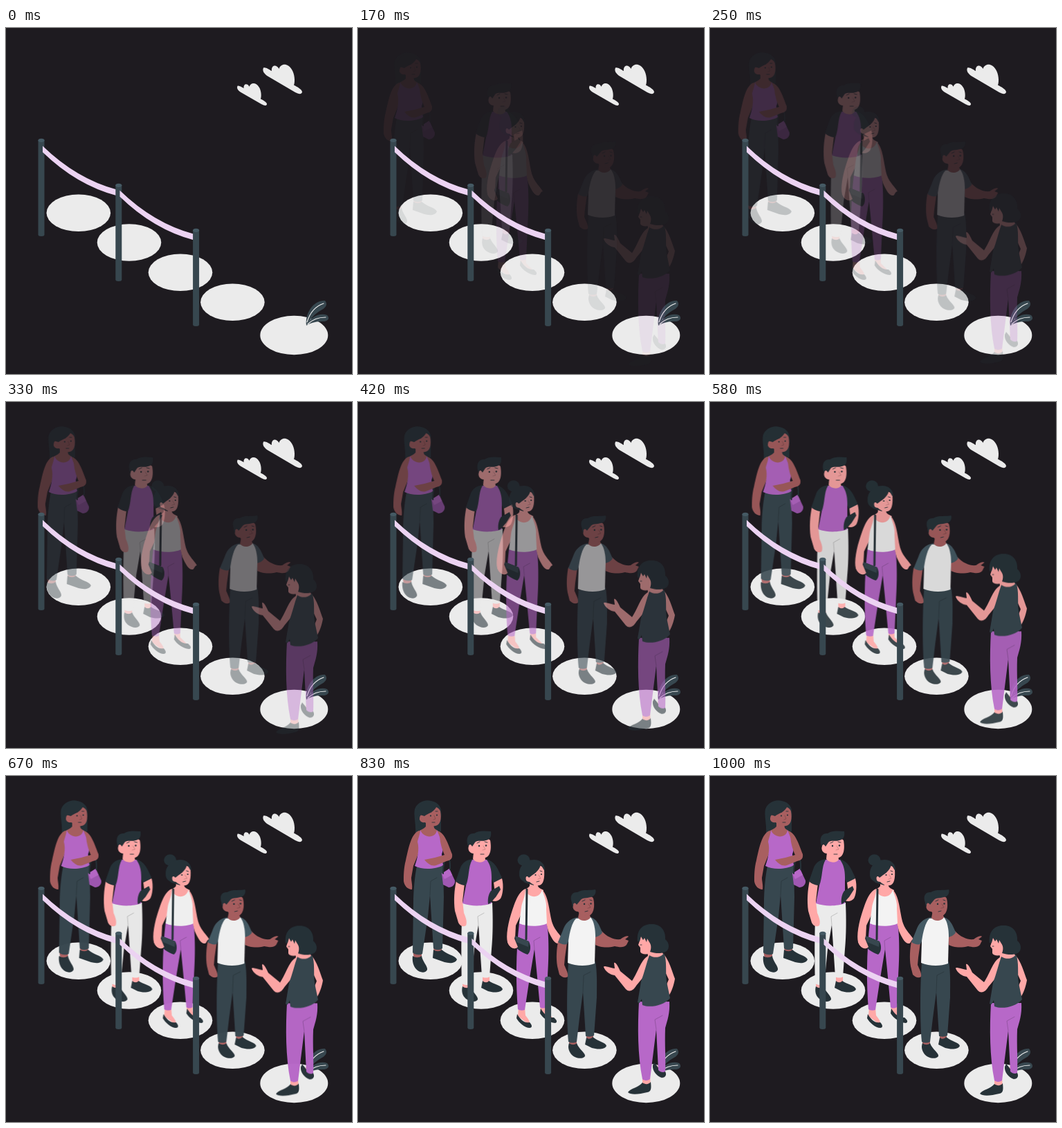
Recreate the animation shown at these times as an HTML page. Size 500 by 500 pixels, loop 1040 ms.

```html
<!DOCTYPE html>
<html lang="en">
<head>
<meta charset="utf-8">
<title>Waiting line</title>
<style>
  html, body { margin: 0; width: 100%; height: 100%; overflow: hidden; background: #1e1b20; }
  svg { display: block; width: 100vw; height: 100vh; }
  .floor { fill: #ebebeb; }
  .ink { fill: #263238; }
  .slate { fill: #37474f; }
  .steel { fill: #455a64; }
  .purple { fill: #b768c8; }
  .plum { fill: #a058b2; }
  .white { fill: #f3f3f3; }
  .pale { fill: #ebebeb; }
  .brown { fill: #a85f60; }
  .pink { fill: #ffa8a7; }
  .rope { fill: #ecd3f2; }
  .line { fill: none; stroke: #263238; stroke-linecap: round; stroke-linejoin: round; }
  .thin { stroke-width: .9; }
  .fold { fill: none; stroke: #000; stroke-opacity: .18; stroke-width: 1; stroke-linecap: round; }
  .rib { fill: none; stroke: #f0f0f0; stroke-width: 1.2; stroke-linecap: round; }
</style>
</head>
<body>
<svg viewBox="0 0 500 500">
  <defs>
    <path id="cloud" d="M372 57.500C375 56 380 60 384 62C383 53 391 52 394.500 59C397 51 407 50 413 60C417 66 418 77 416 82.500C421 85 428 89 428 92.500C427 97 422 95 418 93L378 69.500C373 66 370 62 372 57.500Z"/>
    <g id="post">
      <path class="slate" d="M46.500 162V298.500A4.500 2.500 0 0 0 55.500 298.500V162Z"/>
      <ellipse class="steel" cx="51" cy="162.300" rx="4.500" ry="2.600"/>
    </g>
    <path id="rope" class="rope" d="M53 170.500Q102 218 160 233.500V242.300Q102 227 53 179.500Z"/>
  </defs>

  <g class="floor">
    <use href="#cloud"/>
    <use href="#cloud" transform="translate(51.800 40.500) scale(.76 .75)"/>
    <ellipse cx="104.800" cy="267.300" rx="46.300" ry="26.800"/>
    <ellipse cx="178" cy="310" rx="46.300" ry="26.800"/>
    <ellipse cx="252" cy="353.200" rx="46.300" ry="26.800"/>
    <ellipse cx="327.400" cy="396.300" rx="46.300" ry="26.800"/>
    <ellipse cx="416.300" cy="444" rx="49" ry="28.200"/>
  </g>

  <g class="slate">
    <path d="M434 430C432 411 445 393 461 394C466 400 461 405 455 408C446 413 440 420 434 430Z"/>
    <path d="M434 430C440 417 454 411 464 415C468 419 466 423 460 424C449 424 442 425 434 430Z"/>
    <path class="rib" d="M435 425C439 412 447 402 459 398M436 428C443 421 452 418 462 418"/>
  </g>

  <!-- woman with the purple bag -->
  <g data-from="-30 0">
    <path class="ink" d="M81 82C82 70 78 57 80 48C83 38 95 33 104 36C115 38 120 48 118 60V80L108 84H88Z"/>
    <path class="brown" d="M86 79C75 83 71 104 67 122C64 133 64 144 64 152C65 159 70 164 76 164C77 158 75 152 75 147L78 130L87 108Z"/>
    <path class="brown" d="M77 252H90V264H79ZM107 246H119V256H108Z"/>
    <path class="ink" d="M77 260C81 263 86 263 90 260C91 268 99 275 98 280C96 285 87 285 82 279C78 275 76 267 77 260ZM107 251C111 254 116 254 119 251C126 258 138 259 141 265C139 271 130 271 123 269L106 263Z"/>
    <path class="slate" d="M83 130C80 145 78 165 78 185L77 255C80 259 88 259 91 257L99 203L102 172L107 249C110 252 117 252 120 249L122 175L121 130Z"/>
    <path class="fold" d="M102 172L103 152L112 147"/>
    <path class="plum" d="M119 141L130 134L138 151C139 157 134 161 129 161L121 157Z"/>
    <path class="purple" d="M119 141L130 134L134 143L123 149Z"/>
    <path class="line" stroke-width="2" d="M121 141C121 130 123 119 128 117C132 122 131 129 131 135"/>
    <path class="brown" d="M96 64V73C93 77 87 78 82 82L88 100H114L118 83C115 79 110 78 108 75L107 69Z"/>
    <path class="purple" d="M88 78C88 83 85 90 84 95C87 106 84 119 80 130C91 136 110 135 121 129L119 113C123 103 121 93 116 88L112 78C111 90 93 91 88 78Z"/>
    <path class="brown" d="M90 52C92 43 114 40 117 51C119 62 117 71 110 72C104 73 98 71 95 67C89 68 86 64 87 59C87 56 89 55 91 57Z"/>
    <path class="ink" d="M84 60C82 45 91 37 102 37C112 37 118 43 118 51L112 43C109 52 99 54 94 58L91 57C88 55 87 59 87 63Z"/>
    <path class="brown" d="M115 80C124 84 129 100 134 113C135 120 131 122 126 123L111 129C104 131 99 127 94 121L109 118L123 114C120 108 118 100 117 95Z"/>
    <path class="line thin" d="M101 53L104 52M110 51L113 51M105 67L109 67"/>
    <path class="fold" d="M108 57L110 62L107 63"/>
    <g class="ink"><circle cx="103" cy="57.500" r="1.100"/><circle cx="112" cy="56.500" r="1.100"/></g>
  </g>

  <!-- man with the phone -->
  <g data-from="30 0">
    <path class="pink" d="M153 297H164V309H153ZM182 287H192V300H182Z"/>
    <path class="ink" d="M153 304C157 307 161 307 164 304C166 311 176 318 175 323C172 328 163 326 158 322C153 318 151 311 153 304ZM182 296C185 299 189 299 191 296C198 301 209 302 211 308C208 314 196 313 190 311L180 306Z"/>
    <path class="pale" d="M153 183H196C197 205 197 230 195 250L192 290C190 292 184 292 181 290L176 215L170 250L165 301C161 303 155 302 152 300C151 270 151 215 153 183Z"/>
    <path class="fold" d="M176 215L175 203L184 198"/>
    <path class="pink" d="M144 151L156 155L153 181L155 198C158 205 160 211 158 216C153 219 149 216 147 212L142 195C140 180 141 165 144 151Z"/>
    <path class="ink" d="M168 120C156 121 151 128 149 135L143 152C147 156 153 158 158 158L167 135ZM187 120C200 123 204 134 210 147C207 152 202 154 198 155L190 140Z"/>
    <path class="purple" d="M167 121C161 131 163 146 158 158L153 184C166 189 185 188 195 184L195 146C195 136 193 128 188 121Z"/>
    <path class="pink" d="M198 154L210 148C213 159 211 172 208 177C203 183 195 181 192 178L200 170Z"/>
    <path class="ink" d="M194 166L206 159L208 164L201 175C197 179 193 185 190 185C189 177 191 170 194 166Z"/>
    <path class="pink" d="M169 110L168 120C172 126 183 126 186 121L185 113Z"/>
    <path class="pink" d="M166 95C173 88 189 88 193 93C195 104 194 116 186 118C179 119 173 116 169 112C163 112 160 106 162 101C163 98 166 99 167 101Z"/>
    <path class="ink" d="M160 98C158 89 162 82 170 83C177 78 186 80 194 80C195 87 193 92 187 93C181 95 174 92 171 96L167 102C164 96 161 99 162 104Z"/>
    <path class="line thin" d="M174 97L178 95M185 95L189 96M179 113L184 113"/>
    <path class="fold" d="M183 101L186 106L182 107"/>
    <g class="ink"><circle cx="177" cy="101" r="1.200"/><circle cx="187" cy="100.500" r="1.200"/></g>
  </g>

  <!-- woman with the shoulder bag -->
  <g data-from="-30 0">
    <path class="pink" d="M230 334H239L240 346C245 352 247 356 246 360L229 347ZM261 330H270V340C277 347 282 351 281 354L262 342Z"/>
    <path class="ink" d="M228 344C232 351 238 358 246 356C250 360 250 364 246 364C239 364 230 356 227 350ZM262 336C267 344 273 350 281 349C285 352 287 356 283 357C274 356 265 350 261 343Z"/>
    <path class="purple" d="M231 212H271C274 230 274 260 272 290L270 334C267 336 263 336 261 334L256 280L253 250L246 292L239 338C236 339 231 339 229 337C226 300 226 255 231 212Z"/>
    <path class="fold" d="M253 250L252 238L261 233"/>
    <path class="pink" d="M240 163C228 168 223 188 217 207C214 219 212 232 214 240C217 248 223 251 229 248L225 235L226 216L237 193ZM262 163C274 170 274 198 279 213C283 224 291 230 294 236C290 237 290 243 287 242C282 242 278 235 273 224L267 199Z"/>
    <path class="pink" d="M246 151V159C244 162 240 163 237 165L240 185H266V165C263 163 259 162 258 159L257 155Z"/>
    <path class="white" d="M240 164C240 174 235 182 234 190L231 213C242 218 262 218 271 213L270 192C271 182 267 174 264 164C262 177 244 178 240 164Z"/>
    <path class="ink" d="M232 147C229 135 236 123 248 122L252 158L239 154Z"/>
    <path class="pink" d="M242 136C248 126 265 127 267 135C268 148 266 157 260 158C254 159 249 156 246 153C241 153 238 148 240 144Z"/>
    <ellipse class="ink" cx="237.500" cy="121.500" rx="9" ry="8.200"/>
    <path class="ink" d="M232 147C228 132 239 121 252 121C262 121 269 127 268 138L262 128C260 138 251 142 245 147C241 142 239 147 242 153C237 153 233 150 232 147Z"/>
    <path class="line" stroke-width="3" d="M242 164L241 236"/>
    <path class="ink" d="M225 231L245 239C248 245 248 254 243 258C234 255 226 249 222 243Z"/>
    <path class="slate" d="M225 231L245 239L244 247L227 240Z"/>
    <path class="pink" d="M215 228L222 230L229 247C224 252 217 248 214 240Z"/>
    <path class="line thin" d="M252 139L255 138M261 137L264 138M256 153L260 152"/>
    <path class="fold" d="M259 143L262 148L258 149"/>
    <g class="ink"><circle cx="254.500" cy="143" r="1.100"/><circle cx="263" cy="142" r="1.100"/></g>
  </g>

  <use href="#post"/>
  <use href="#rope"/>
  <use href="#post" transform="translate(111.800 65)"/>
  <use href="#rope" transform="translate(111.500 64.200)"/>
  <use href="#post" transform="translate(223.600 130)"/>

  <!-- man reaching out -->
  <g data-from="30 0">
    <path class="brown" d="M307 380H318V392H307ZM332 373H342V384H332Z"/>
    <path class="ink" d="M307 386C311 389 315 389 318 386C321 395 331 400 330 405C326 410 315 408 310 402C306 397 305 391 307 386ZM332 378C335 381 339 380 341 377C349 384 360 385 361 390C358 396 347 395 340 393L330 388Z"/>
    <path class="slate" d="M306 268H345C348 285 347 305 347 320L343 375C340 377 334 377 331 376L327 312L322 350L318 384C315 386 309 386 306 384C303 345 304 300 306 268Z"/>
    <path class="fold" d="M327 312L328 288L338 283"/>
    <path class="brown" d="M291 239L304 241L301 262L300 273C303 280 306 285 305 290C301 293 296 290 293 287L290 275C288 263 289 250 291 239ZM344 230L354 224C362 233 373 237 381 236C386 232 392 230 393 232L388 236L393 238L390 244C386 249 378 247 373 246C361 249 350 247 345 244Z"/>
    <path class="steel" d="M320 204C307 206 301 214 298 223L291 240C295 243 300 244 304 243L314 222ZM338 204C347 207 350 214 355 226C353 230 348 232 345 233L340 218Z"/>
    <path class="white" d="M317 206C311 212 308 225 306 238L305 270C317 275 333 275 344 271L345 232C345 221 343 210 338 204Z"/>
    <path class="brown" d="M322 194L320 205C324 211 335 210 338 204L335 196Z"/>
    <path class="brown" d="M317 178C324 171 339 171 342 177C345 189 342 201 335 202C328 203 323 200 320 196C314 196 311 190 313 185C314 182 317 183 318 185Z"/>
    <path class="ink" d="M311 183C307 173 312 167 319 168C327 163 337 166 345 164C347 169 343 175 338 175C332 177 326 175 323 180L318 186C315 181 312 184 313 189C311 188 311 185 311 183Z"/>
    <path class="line thin" d="M326 181L330 179M337 179L340 180M330 196L334 195"/>
    <path class="fold" d="M335 185L338 190L334 191"/>
    <g class="ink"><circle cx="329" cy="185" r="1.200"/><circle cx="338.500" cy="184.500" r="1.200"/></g>
  </g>

  <!-- woman seen from behind -->
  <g data-from="0 30">
    <path class="pink" d="M411 436H422L423 450H411ZM433 420H444V432H435Z"/>
    <path class="ink" d="M411 445C415 448 420 448 423 444C424 453 424 458 418 459C406 462 394 463 390 459C394 453 406 452 411 445ZM428 416C433 421 437 430 444 429C447 435 443 438 439 438C432 436 425 428 426 420Z"/>
    <path class="purple" d="M406 328H450C451 345 447 355 444 366C443 390 445 412 444 429C441 431 437 430 434 427L431 368L422 440C418 443 413 442 411 440C404 405 404 365 406 328Z"/>
    <path class="fold" d="M431 368L429 354L440 348"/>
    <path class="pink" d="M442 260C449 267 454 284 458 295C456 306 453 313 449 320L444 308L449 296L443 283Z"/>
    <path class="pink" d="M421 261C409 266 406 283 396 298L379 284C376 277 372 270 370 272L371 280C364 279 355 275 355 278C358 285 364 289 371 290L387 310C392 315 398 312 402 305L416 288Z"/>
    <path class="pink" d="M418 250H436L442 261L430 268L419 263Z"/>
    <path class="slate" d="M421 261C429 266 438 264 442 258C447 268 444 285 446 299L451 323C440 335 421 337 411 333L410 324L407 330L404 329L409 299C414 285 417 272 421 261Z"/>
    <path class="pink" d="M408 231H426L430 256C427 261 422 261 420 259C414 260 409 259 408 256L408 250L405 246L407 240Z"/>
    <path class="ink" d="M404 241C402 224 412 215 425 216C438 216 445 226 444 238C451 243 451 255 442 257C436 259 428 258 422 256C424 251 424 246 421 242L418 237L417 242L414 236L412 239L409 234L407 241Z"/>
    <ellipse class="pink" cx="419.500" cy="246" rx="2.400" ry="3.600"/>
    <path class="line thin" d="M408 246L410 246"/>
  </g>
</svg>
<script>
  const LOOP = 1040, RATE = 24;

  const slides = [...document.querySelectorAll('[data-from]')].map(el => {
    const [x, y] = el.dataset.from.split(' ');
    const slide = el.animate([
      { opacity: 0, transform: `translate(${x}px, ${y}px)` },
      { opacity: 1, transform: 'translate(0px, 0px)' }
    ], { duration: 1000, easing: 'cubic-bezier(.36, -.01, .5, 1.38)', fill: 'both' });
    slide.pause();
    return slide;
  });

  const start = performance.now();

  // Poses change 24 times a second, on whole hundredths of a second.
  function draw() {
    const time = (performance.now() - start) % LOOP;
    const tick = Math.floor((Math.floor(time / 10) * 10 + 4.9) * RATE / 1000);
    for (const slide of slides) slide.currentTime = tick * 1000 / RATE;
    requestAnimationFrame(draw);
  }
  draw();
</script>
</body>
</html>
```
